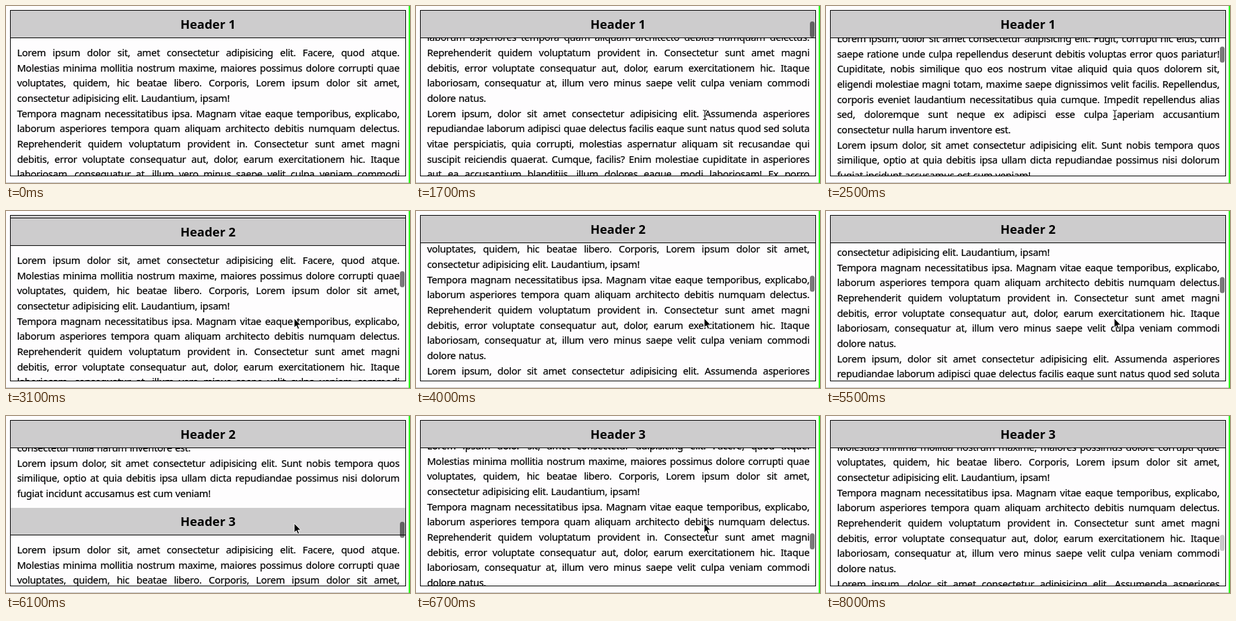
An HTML page that plays this animation: 600 px wide and 264 px high, repeating every 8.1 s.

```html
<!DOCTYPE html>
<html lang="en">
<head>
<meta charset="utf-8">
<title>Sticky headers</title>
<style>
  html, body { margin: 0; width: 100%; height: 100%; overflow: hidden; background: #fff; }
  #stage { position: relative; width: 600px; height: 264px; overflow: hidden; background: #fefdfe; }
  #box {
    position: absolute; left: 6px; top: 6px; width: 586px; height: 246px;
    border: 1px solid #000; overflow: hidden;
    font-family: Tahoma, "Noto Sans", "Open Sans", sans-serif; color: #000;
  }
  section { position: absolute; left: 0; top: 0; width: 586px; height: 741px; }
  h1 {
    position: absolute; left: 0; top: 0; z-index: 1; box-sizing: border-box;
    width: 100%; height: 41px; margin: 0; background: #cdcccd; border-bottom: 1px solid #000;
    font-size: 18.35px; font-weight: 700; line-height: 40px; text-align: center;
  }
  .body {
    position: absolute; left: 9.4px; top: 51px; width: 568px;
    font-size: 14.6px; line-height: 22.67px; letter-spacing: -.28px; word-spacing: .7px;
    -webkit-text-stroke: .2px #000;
  }
  p { margin: 0; }
  p span { display: block; height: 22.67px; white-space: nowrap; text-align: justify; text-align-last: justify; }
  p span:last-child { text-align-last: left; }
  #thumb { position: absolute; left: 585px; top: 0; width: 7px; height: 23.5px; border-radius: 3.5px; background: rgba(0, 0, 0, .52); }
  #edge { position: absolute; right: 0; top: 0; width: 2px; height: 264px; background: #2bfa1c; }
  #floor { position: absolute; left: 0; bottom: 0; width: 598px; height: 1px; background: #c6c6c6; }
  #pointer { position: absolute; left: 0; top: 0; width: 24px; height: 24px; overflow: visible; }
</style>
</head>
<body>
<div id="stage">
  <div id="box"></div>
  <div id="thumb"></div>
  <div id="floor"></div>
  <div id="edge"></div>
  <svg id="pointer">
    <g id="beam" fill="none" stroke-linecap="round">
      <path d="M-2 -6.5Q0 -6.5 0.5 -5Q1 -6.5 3 -6.5M.5 -5V6M-2 7.5Q0 7.5 .5 6Q1 7.5 3 7.5M-1 2H2" stroke="#fff" stroke-width="2.6"/>
      <path d="M-2 -6.5Q0 -6.5 0.5 -5Q1 -6.5 3 -6.5M.5 -5V6M-2 7.5Q0 7.5 .5 6Q1 7.5 3 7.5M-1 2H2" stroke="#111" stroke-width="1.1"/>
    </g>
    <path id="arrow" d="M-.5 -2V12L2.7 9.1L4.9 14.2L7.2 13.2L5 8.2H9.4Z" fill="#000" stroke="#fff"/>
  </svg>
</div>
<script>
const LOOP = 8100, SECTION_HEIGHT = 741, HEADER_HEIGHT = 41;

const copy = `Lorem ipsum dolor sit, amet consectetur adipisicing elit. Facere, quod atque.
Molestias minima mollitia nostrum maxime, maiores possimus dolore corrupti quae
voluptates, quidem, hic beatae libero. Corporis, Lorem ipsum dolor sit amet,
consectetur adipisicing elit. Laudantium, ipsam!

Tempora magnam necessitatibus ipsa. Magnam vitae eaque temporibus, explicabo,
laborum asperiores tempora quam aliquam architecto debitis numquam delectus.
Reprehenderit quidem voluptatum provident in. Consectetur sunt amet magni
debitis, error voluptate consequatur aut, dolor, earum exercitationem hic. Itaque
laboriosam, consequatur at, illum vero minus saepe velit culpa veniam commodi
dolore natus.

Lorem ipsum, dolor sit amet consectetur adipisicing elit. Assumenda asperiores
repudiandae laborum adipisci quae delectus facilis eaque sunt natus quod sed soluta
vitae perspiciatis, quia corrupti, molestias aspernatur aliquam sit recusandae qui
suscipit reiciendis quaerat. Cumque, facilis? Enim molestiae cupiditate in asperiores
aut ea accusantium blanditiis, illum dolores eaque, modi laboriosam! Ex porro
quisquam nihil, tempore dolorum veritatis ullam fugiat sapiente, harum quod
deleniti eos nesciunt. Placeat, omnis rerum voluptatem iusto autem dolore
minima, officiis quas eveniet nulla. Itaque sequi, ratione impedit nemo
voluptatibus, atque earum cumque illo debitis. Optio, similique quae
maiores animi expedita.

Lorem ipsum, dolor sit amet consectetur adipisicing elit. Fugit, corrupti hic eius, cum
saepe ratione unde culpa repellendus deserunt debitis voluptas error quos pariatur!
Cupiditate, nobis similique quo eos nostrum vitae aliquid quia quos dolorem sit,
eligendi molestiae magni totam, maxime saepe dignissimos velit facilis. Repellendus,
corporis eveniet laudantium necessitatibus quia cumque. Impedit repellendus alias
sed, doloremque sunt neque ex adipisci esse culpa aperiam accusantium
consectetur nulla harum inventore est.

Lorem ipsum dolor, sit amet consectetur adipisicing elit. Sunt nobis tempora quos
similique, optio at quia debitis ipsa ullam dicta repudiandae possimus nisi dolorum
fugiat incidunt accusamus est cum veniam!`;

// [time in ms, scroll offset in px]
const scrollKeys = [
  [1220, 0], [1700, 136], [2500, 474], [3250, 765], [4000, 799], [5250, 801],
  [5500, 816.6], [6100, 1351.5], [6550, 1490], [7050, 1528]
];
const pointerKeys = { x: [[100, 462], [800, 428.5], [7050, 428.5], [7500, 612]],
                      y: [[100, 275], [800, 162], [7050, 162], [7500, 190]] };

const $ = id => document.getElementById(id);
const clamp = (v, lo, hi) => Math.min(hi, Math.max(lo, v));

// Monotone cubic interpolation through the keys, resting at both ends.
function curve(keys, t) {
  const last = keys.length - 1;
  if (t <= keys[0][0]) return keys[0][1];
  if (t >= keys[last][0]) return keys[last][1];
  const slope = k => (keys[k + 1][1] - keys[k][1]) / (keys[k + 1][0] - keys[k][0]);
  const tangent = k => {
    if (k === 0 || k === last) return 0;
    const a = slope(k - 1), b = slope(k);
    return a * b > 0 ? 2 * a * b / (a + b) : 0;
  };
  const i = keys.findIndex(key => key[0] > t) - 1;
  const [t0, v0] = keys[i], [t1, v1] = keys[i + 1];
  const span = t1 - t0, u = (t - t0) / span, w = 1 - u;
  return v0 * w * w * (1 + 2 * u) + v1 * u * u * (3 - 2 * u)
    + span * u * w * (tangent(i) * w - tangent(i + 1) * u);
}

const paragraphs = copy.split("\n\n").map(text =>
  `<p>${text.split("\n").map(line => `<span>${line}</span>`).join("")}</p>`).join("");

const sections = [1, 2, 3].map(n => {
  const node = document.createElement("section");
  node.innerHTML = `<h1>Header ${n}</h1><div class="body">${paragraphs}</div>`;
  $("box").append(node);
  return { node, header: node.firstChild };
});

function draw(t) {
  const scroll = curve(scrollKeys, t);
  sections.forEach(({ node, header }, i) => {
    const top = i * SECTION_HEIGHT - scroll;
    node.style.transform = `translateY(${top}px)`;
    header.style.transform = `translateY(${clamp(-top, 0, SECTION_HEIGHT - HEADER_HEIGHT)}px)`;
  });

  $("thumb").style.transform = `translateY(${8 + scroll * 0.1108}px)`;
  $("thumb").style.opacity = t < 1250 ? 0 : clamp(1 - (t - 7800) / 330, 0, 1);

  const x = curve(pointerKeys.x, t), y = curve(pointerKeys.y, t);
  const overText = t < 2900;
  $("pointer").style.transform = `translate(${x}px, ${y}px)`;
  $("pointer").style.display = t > 100 && t < 7500 ? "" : "none";
  $("beam").style.display = overText ? "" : "none";
  $("arrow").style.display = overText ? "none" : "";
}

const start = performance.now();
function tick() {
  draw((performance.now() - start) % LOOP);
  requestAnimationFrame(tick);
}
draw(0);
requestAnimationFrame(tick);
</script>
</body>
</html>
```
